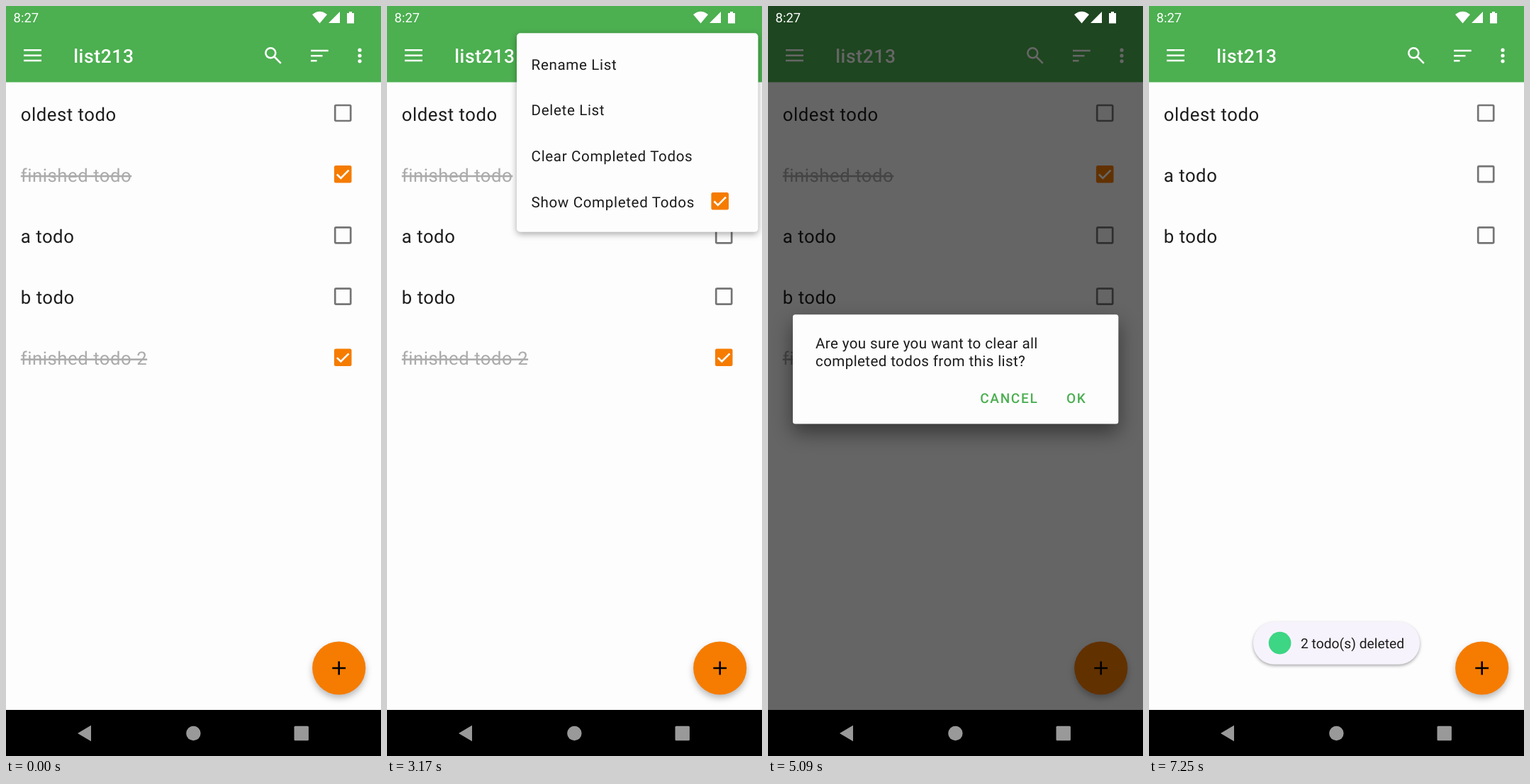
Recreate the animation shown at these times as an HTML page. Size 529 by 1058 pixels, loop 7.29 s.

```html
<!DOCTYPE html>
<html lang="en">
<head>
<meta charset="utf-8">
<title>Clear completed todos</title>
<style>
  html, body { margin: 0; height: 100%; overflow: hidden; background: #fdfdfe; }
  svg { display: block; width: 100vw; height: 100vh; }
  text { font-family: Roboto, sans-serif; text-rendering: geometricPrecision; fill: #1c1c1c; }
  .row text { font-size: 25.74px; letter-spacing: .52px; }
  .row .done { fill: #ababab; text-decoration: line-through; }
  .title { font-size: 26.5px; font-weight: 500; letter-spacing: .6px; fill: #fff; }
  .menu text { font-size: 20.6px; letter-spacing: .64px; }
  .body { font-size: 20.6px; letter-spacing: .37px; }
  .button { font-size: 19px; font-weight: 500; letter-spacing: 1.7px; fill: #4caf50; }
  .line { fill: none; stroke: #fff; stroke-width: 2.6; }
  #menu { filter: drop-shadow(0 3px 5px #0005); }
  #dialog { filter: drop-shadow(0 12px 14px #0007); }
  #toast { filter: drop-shadow(0 2px 2px #0005); }
  #fab { filter: drop-shadow(0 5px 5px #0004); }
</style>
</head>
<body>
<svg id="stage" viewBox="0 0 529 1058" preserveAspectRatio="none"></svg>
<script>
const LOOP = 7290, PITCH = 86.2;
const rows = [
  ['oldest todo', false], ['finished todo', true], ['a todo', false],
  ['b todo', false], ['finished todo 2', true],
];
const menuItems = ['Rename List', 'Delete List', 'Clear Completed Todos', 'Show Completed Todos'];

const text = (x, y, label, cls = '') => `<text x="${x}" y="${y}" class="${cls}">${label}</text>`;
const rect = (x, y, w, h, fill, r = 0) =>
  `<rect x="${x}" y="${y}" width="${w}" height="${h}" rx="${r}" fill="${fill}"/>`;
const circle = (x, y, r, fill) => `<circle cx="${x}" cy="${y}" r="${r}" fill="${fill}"/>`;
const checkbox = (x, y, on) => `<g transform="translate(${x} ${y})">` + (on
  ? rect(-12.3, -12.3, 24.6, 24.6, '#f57c00', 2.5) + '<path class="line" d="M-8.3 .3l5.4 5.4L8.3 -5.5"/>'
  : '<rect x="-11" y="-11" width="22" height="22" rx="1.4" fill="none" stroke="#757575" stroke-width="2.7"/>') + '</g>';

const stage = document.getElementById('stage');
stage.innerHTML =
  rect(0, 0, 529, 1058, '#fdfdfe') +
  rows.map(([label, done]) =>
    `<g class="row">${text(20.8, 161.5, label, done ? 'done' : '')}${checkbox(475.2, 151, done)}</g>`).join('') +
  rect(0, 0, 529, 107.5, '#4caf50') +
  text(95.2, 80.3, 'list213', 'title') +
  `<path class="line" d="M25 62.3h25M25 69.7h25M25 77h25
    M430 63h24.7M430 70.2h16.5M430 77.3h8.5M378.5 71.5l9.3 9.3"/>
  <circle class="line" cx="373.3" cy="66.3" r="7"/>` +
  [62.2, 70, 77.8].map(y => circle(499, y, 2.6, '#fff')).join('') +
  `<g id="fab">${circle(469.7, 934, 37.6, '#f57c00')}</g>
  <path d="M460.3 934h18.8M469.7 924.6v18.8" stroke="#000" stroke-width="2.6"/>
  <g id="menu" class="menu">` +
  rect(183, 38.3, 340.5, 280.5, '#fdfdfe', 5) +
  menuItems.map((label, i) => text(203.6, 89.6 + i * 64.7, label)).join('') +
  checkbox(469.7, 275.2, true) + '</g>' +
  '<rect id="scrim" width="529" height="1058"/>' +
  rect(0, 993, 529, 65, '#000') +
  `<path fill="#999" d="M101 1026L120 1014.7V1037.3Z"/>` +
  circle(264.4, 1026, 10.2, '#999') + rect(406.5, 1015.8, 20.4, 20.4, '#999', 1.5) +
  `<text x="10.6" y="23.2" font-size="18.4" style="fill:#fff">8:27</text>
  <path fill="#fff" d="M432 12Q442.5 3.500 453 12L442.500 24.500ZM471 8V24H455Z
    M481 10h3v-2h4v2h3v14.500h-10Z"/>
  <g id="dialog">` +
  rect(35, 435.3, 459.3, 154.3, '#fdfdfe', 3.5) +
  text(67, 482.6, 'Are you sure you want to clear all', 'body') +
  text(67, 508.2, 'completed todos from this list?', 'body') +
  text(299.2, 559.5, 'CANCEL', 'button') + text(421, 559.5, 'OK', 'button') + '</g>' +
  '<g id="toast">' + rect(147, 868.8, 235, 60, '#f7f3fc', 30) +
  '<g id="message">' + circle(184.6, 898.6, 15.8, '#3cd684') +
  '<text x="214" y="906" font-size="19.3">2 todo(s) deleted</text></g></g>';

const [menu, scrim, dialog, toast, message] =
  ['menu', 'scrim', 'dialog', 'toast', 'message'].map(id => document.getElementById(id));
const rowNodes = [...document.querySelectorAll('.row')];

const ramp = (t, start, length) => Math.min(1, Math.max(0, (t - start) / length));
const easeOut = p => 1 - (1 - p) ** 3;
const easeInOut = p => (1 - Math.cos(Math.PI * p)) / 2;
const fade = (node, alpha) => {
  node.style.opacity = alpha;
  node.style.visibility = alpha > 0 ? 'visible' : 'hidden';
};

function draw(t) {
  fade(menu, ramp(t, 2650, 180) - ramp(t, 3860, 120));

  const enter = easeOut(ramp(t, 3800, 200)), leave = ramp(t, 5120, 200) ** 1.4;
  fade(scrim, .6 * (ramp(t, 3800, 200) - ramp(t, 5120, 200)));
  fade(dialog, enter - leave);
  dialog.setAttribute('transform', `translate(0 ${40 * (1 - enter) - 13 * leave})`);

  // Finished rows fade out first, then the others close the gaps.
  const removed = ramp(t, 5170, 120), closed = easeInOut(ramp(t, 5290, 250));
  let gaps = 0;
  rows.forEach(([, done], i) => {
    rowNodes[i].setAttribute('transform', `translate(0 ${PITCH * (i - gaps * closed)})`);
    if (done) { fade(rowNodes[i], 1 - removed); gaps++; }
  });

  const pop = ramp(t, 5130, 150), scale = .9 + .1 * pop;
  fade(toast, Math.min(1, pop * 1.6));
  toast.setAttribute('transform', `translate(264.5 898.8) scale(${scale}) translate(-264.5 -898.8)`);
  fade(message, ramp(t, 5220, 150));
}

const begin = performance.now();
function tick() {
  draw((performance.now() - begin) % LOOP);
  requestAnimationFrame(tick);
}
tick();
</script>
</body>
</html>
```
